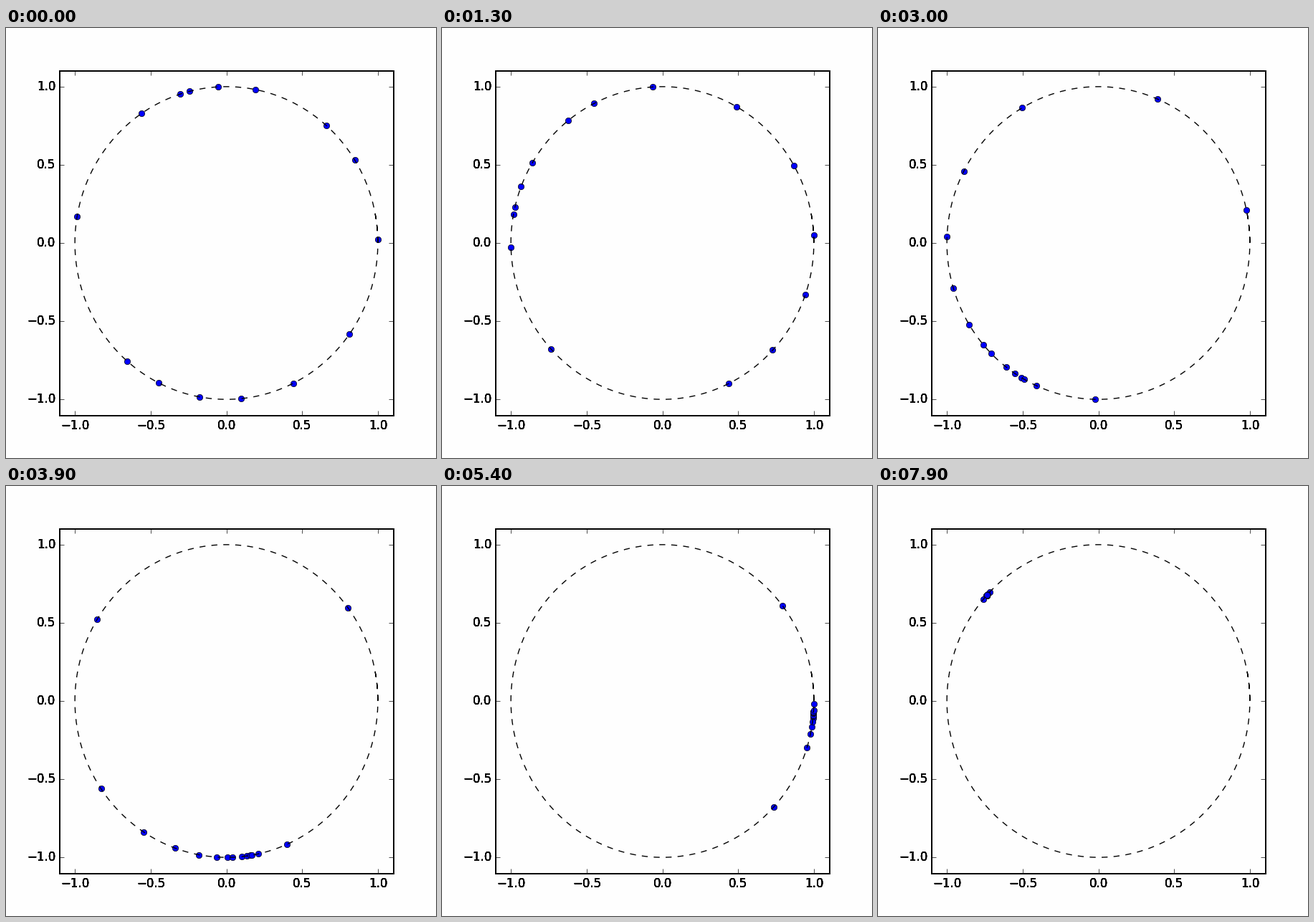
A matplotlib script that plays this animation: 600x600 px, repeating every 8 s.

```python
import numpy as np
import matplotlib.pyplot as plt
from matplotlib.animation import FuncAnimation
from matplotlib.transforms import IdentityTransform

plt.rcParams["font.family"] = "DejaVu Sans"

FRAMES, STEP_MS = 80, 100
SPIN = 0.1         # common natural frequency, radians per step
COUPLING = 0.1235  # pull towards the mean phase, per step
SUBSTEPS = 10
PAPER = "#fefefe"

start = np.array([0.021, 0.560, 0.850, 1.378, 1.625, 1.817, 1.881, 2.165,
                  2.971, 3.998, 4.249, 4.534, 4.809, 5.170, 5.661])
weight = np.ones(len(start))
weight[[0, 4, 7]] = 2  # coincident pairs count twice


def advance(theta):
    """One step of the Kuramoto model, in the frame turning with SPIN."""
    for _ in range(SUBSTEPS):
        mean = np.average(np.exp(1j * theta), weights=weight)
        pull = COUPLING / SUBSTEPS * abs(mean)
        theta = theta + pull * np.sin(np.angle(mean) - theta)
    return theta


phases = [start]
while len(phases) < FRAMES:
    phases.append(advance(phases[-1]))

fig = plt.figure(figsize=(6, 6), dpi=100, facecolor=PAPER)
ax = fig.add_axes([0.125, 0.1, 0.775, 0.8], facecolor=PAPER)
ax.set(xlim=(-1.1, 1.1), ylim=(-1.1, 1.1))

ticks = np.linspace(-1, 1, 5)
ax.set_xticks(ticks)
ax.set_yticks(ticks)
ax.tick_params(direction="in", length=4, width=0.5, top=True, right=True,
               labelbottom=False, labelleft=False)

# The border sits on whole pixels, two pixels wide.
ax.spines[:].set_visible(False)
fig.add_artist(plt.Rectangle((75, 59), 466, 481, fill=False, ec="black",
                             lw=1.44, transform=IdentityTransform()))


def label(value, xy, coords, offset, ha, va):
    text = f"{value:.1f}".replace("-", "\u2212")
    for _ in range(6):  # repeated drawing gives the heavier edges
        ax.annotate(text, xy, xycoords=coords, xytext=offset,
                    textcoords="offset points", ha=ha, va=va, fontsize=12)


for v in ticks:
    label(v, (v, 0), ("data", "axes fraction"), (0, -4), "center", "top")
    label(v, (0, v), ("axes fraction", "data"), (-4, 0), "right", "center")

dots, = ax.plot([], [], "o", ms=6, mfc="blue", mec="black", mew=0.5, zorder=2)

# The dashed ring runs a little past one full turn.
ring = np.linspace(0, 6.47, 400)
ax.plot(np.cos(ring), np.sin(ring), color="black", lw=1,
        linestyle=(0, (6, 6)), dash_capstyle="butt", zorder=3)


def draw(n):
    theta = phases[n] + SPIN * n
    dots.set_data(np.cos(theta), np.sin(theta))
    return dots,


anim = FuncAnimation(fig, draw, frames=FRAMES, interval=STEP_MS,
                     repeat=True, repeat_delay=0, blit=False)
plt.show()
```
